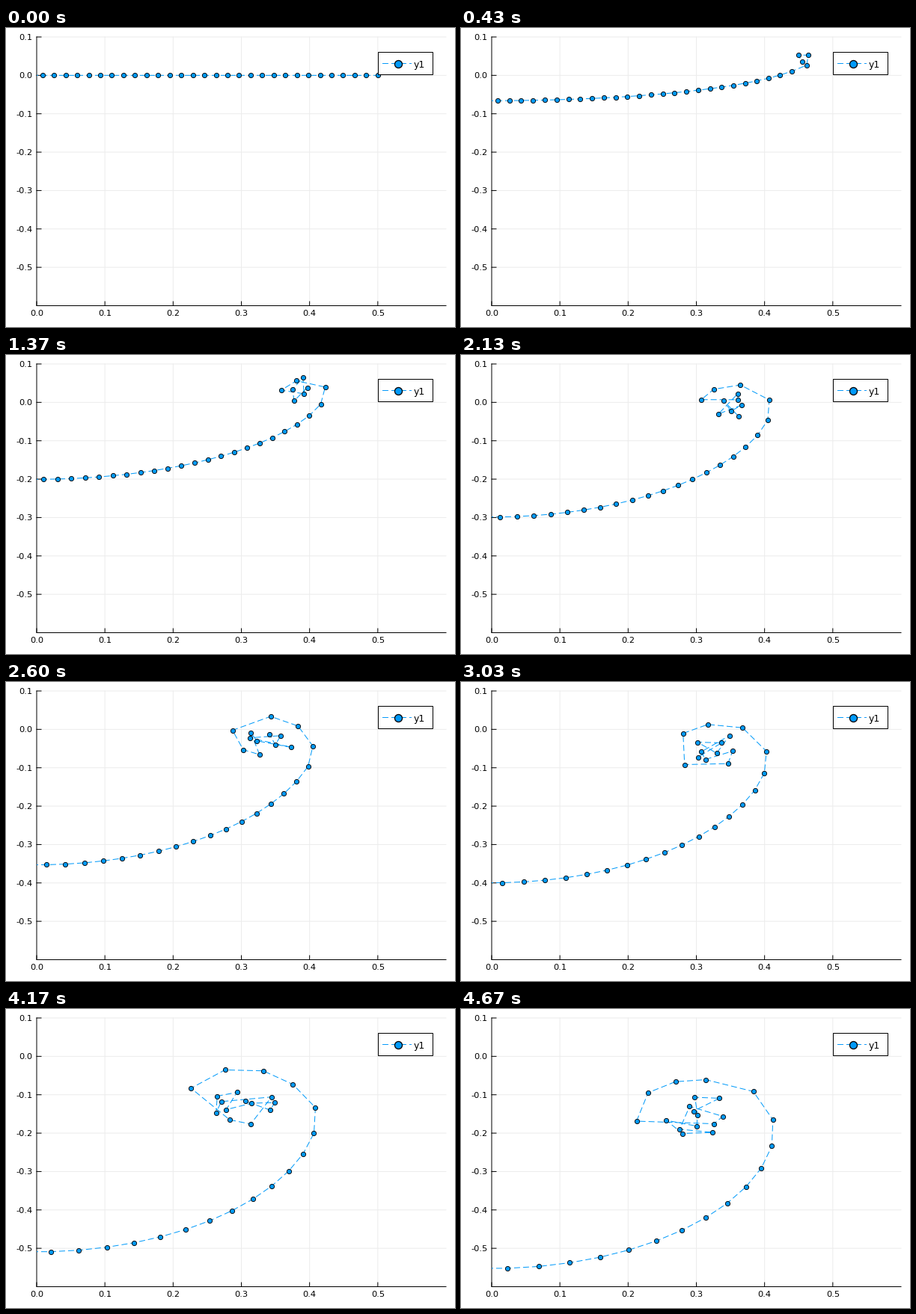
Write a matplotlib script that moves like this. It is 600x400 px and loops after 4.71 s.

```python
import numpy as np
import matplotlib.pyplot as plt
from matplotlib.animation import FuncAnimation
from matplotlib.patches import Rectangle

W, H, DPI = 600, 400, 100
PX = 72 / DPI                      # points per pixel
LEFT, RIGHT, TOP, BOTTOM = 41, 588, 12, 371.5
BLUE, INK, GRID = "#009afa", "black", "#ececec"
LOOP_MS, TICK_MS, STATES = 4710, 10, 141
COUNT, STEP, SUBSTEPS = 60, 0.004, 10


def sx(x):
    return LEFT + (RIGHT - LEFT) * np.asarray(x) / 0.6


def sy(y):
    return TOP + (BOTTOM - TOP) * (0.1 - np.asarray(y)) / 0.7


def velocity(p):
    """Plane velocity induced by point vortices whose strength follows x."""
    dx, dy = p[:, None, :] - p[:, :, None]
    r2 = dx**2 + dy**2
    np.fill_diagonal(r2, np.inf)
    k = 8 * p[0][:, None] / ((COUNT - 1) * 2 * np.pi * r2)
    return np.array([-(k * dy).sum(0), (k * dx).sum(0)])


def advance(p, dt):
    a = velocity(p)
    b = velocity(p + dt / 2 * a)
    c = velocity(p + dt / 2 * b)
    d = velocity(p + dt * c)
    return p + dt / 6 * (a + 2 * b + 2 * c + d)


def roll_up():
    p = np.array([np.linspace(-0.5, 0.5, COUNT), np.zeros(COUNT)])
    path = [p]
    for _ in range(STATES - 1):
        for _ in range(SUBSTEPS):
            p = advance(p, STEP / SUBSTEPS)
        path.append(p)
    return path


path = roll_up()

fig = plt.figure(figsize=(W / DPI, H / DPI), dpi=DPI, facecolor="white")
ax = fig.add_axes([0, 0, 1, 1])
ax.set_xlim(0, W)
ax.set_ylim(H, 0)
ax.axis("off")


def line(xs, ys, color=INK, width=1, **kw):
    return ax.plot(xs, ys, color=color, lw=width * PX, snap=False, **kw)[0]


def label(x, y, s, ha, size=11.4):
    ax.text(x, y, s, ha=ha, va="center_baseline", size=size * PX,
            family="DejaVu Sans", color=INK, zorder=6)


for i in range(6):
    px = float(sx(i / 10))
    if i:
        line([px, px], [TOP, BOTTOM], GRID, zorder=0)
    line([px, px], [BOTTOM, BOTTOM - 5.5], zorder=2)
    label(px, 381, f"{i / 10:.1f}", "center")
for i in range(1, -6, -1):
    py = float(sy(i / 10))
    line([LEFT, RIGHT], [py, py], GRID, zorder=0)
    line([LEFT, LEFT + 6], [py, py], zorder=2)
    label(35.5, py, f"{i / 10:.1f}", "right")
line([LEFT, LEFT, RIGHT], [TOP, BOTTOM, BOTTOM], zorder=2)

DASH = dict(dashes=(8, 4), dash_capstyle="butt")
frame_box = Rectangle((LEFT, TOP), RIGHT - LEFT, BOTTOM - TOP,
                      transform=ax.transData)
sheet = line([], [], BLUE, zorder=3, marker="o", ms=6.2 * PX,
             mfc=BLUE, mec=INK, mew=0.9 * PX, **DASH)
sheet.set_clip_path(frame_box)

ax.add_patch(Rectangle((497.5, 32.5), 73, 30, fc="white", ec=INK,
                       lw=PX, snap=False, zorder=5))
line([503, 542], [47.5, 47.5], BLUE, zorder=6, **DASH)
line([524], [47.5], zorder=7, marker="o", ms=10 * PX, mfc=BLUE,
     mec=INK, mew=1.3 * PX)
label(545, 47.5, "y1", "left", 12.4)


def draw(i):
    x, y = path[min((3 * i + 1) // 10, STATES - 1)]
    sheet.set_data(sx(x), sy(y))
    return [sheet]


anim = FuncAnimation(fig, draw, frames=LOOP_MS // TICK_MS, interval=TICK_MS,
                     repeat=True, repeat_delay=0)
plt.show()
```
